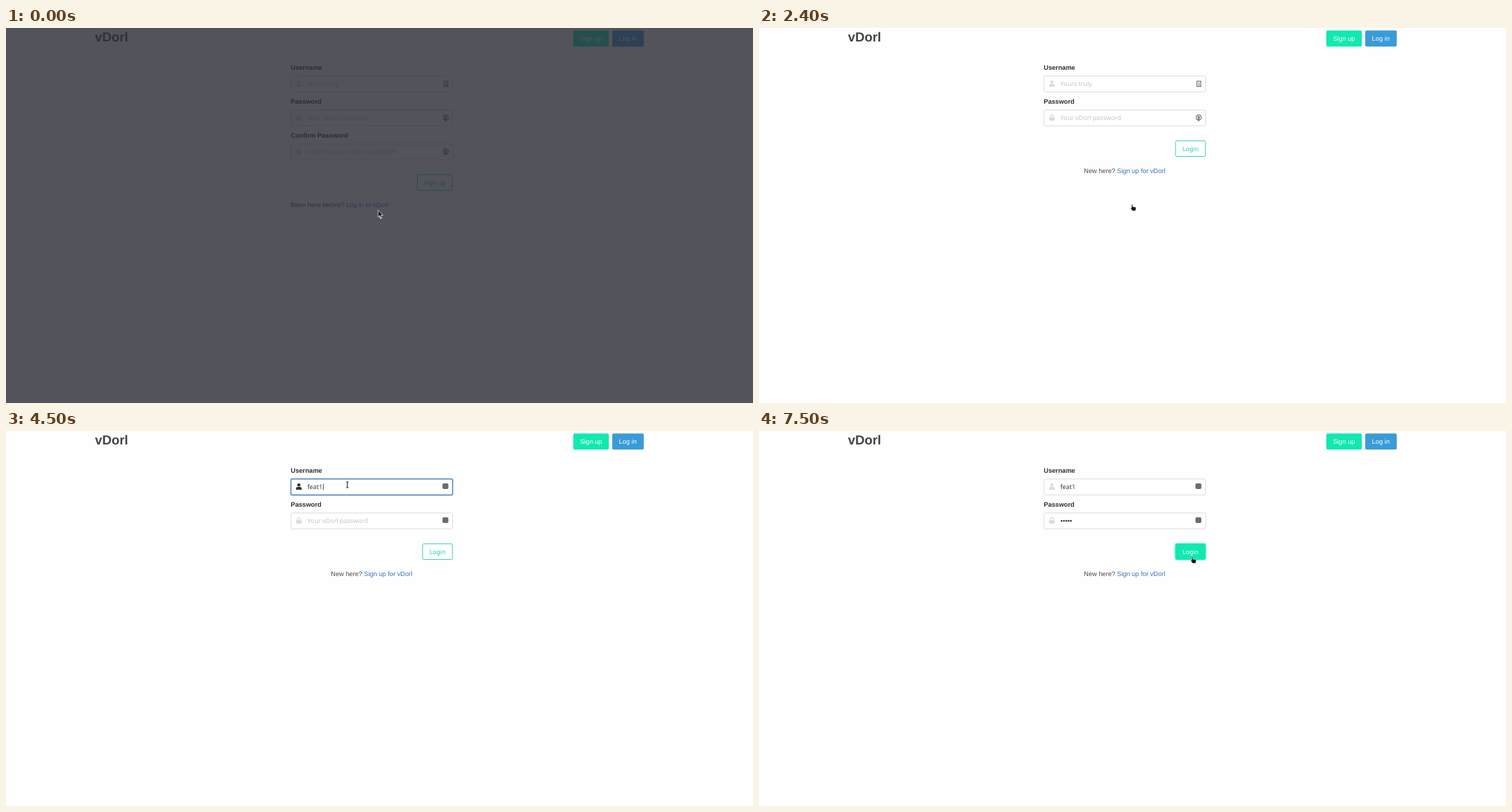
These frames come from a looping animation (1056 px wide and 530 px high, 8 s). An HTML page:

```html
<!DOCTYPE html>
<html lang="en">
<head>
<meta charset="utf-8">
<title>vDorl</title>
<style>
  html, body { margin: 0; width: 100%; height: 100%; overflow: hidden; background: #fefefe; }
  svg { display: block; width: 1056px; height: 530px; text-rendering: geometricPrecision; }
  text { font: 9.2px "Liberation Sans", Arial, sans-serif; fill: #4a4a4a; white-space: pre; }
  .brand { font-size: 18.4px; font-weight: 700; fill: #444; }
  .label { font-weight: 700; fill: #303030; }
  .link { fill: #3a72b8; }
  .link.hover { fill: #363636; }
  .value { font: 8.85px "Noto Sans", sans-serif; fill: #363636; }
  .hint { fill: #c4c4c4; }
  .action { font: 8.6px "Noto Sans", sans-serif; }
  .mid { text-anchor: middle; }
  .white { fill: #fff; }
  .teal { fill: #16d3a6; }
  .row { fill: #e6e6e6; }
</style>
</head>
<body>
<svg id="stage" viewBox="0 0 1056 530"></svg>
<script>
const DURATION = 8000;
const GREEN = '#10e9b1';
const BRAND = 'vDorl';
const USERS = ['feat1', 'tree', 'feat3', 'Norvi', 'nev', 'feat2'];
const MATCHES = ['feat1', 'feat3', 'feat2'];

// [time, changes]; every step keeps what earlier steps set
const steps = [
  [0, { page: 'signup', dim: true, cursor: ['arrow', 525.5, 257], user: '', dots: 0, focus: '', hover: '',
        rows: null, popupRows: 0, badge: false, caret: true, linkHover: false, ring: false }],
  [500, { dim: false }],
  [700, { cursor: ['arrow', 525.5, 255] }],
  [900, { cursor: ['hand', 525, 251], linkHover: true }],
  [1000, { cursor: ['hand', 525, 250] }],
  [1100, { cursor: ['hand', 525, 249] }],
  [2400, { page: 'login', linkHover: false }],
  [2500, { cursor: ['arrow', 525.5, 248] }],
  [2800, { cursor: ['beam', 497, 122], hover: 'password' }],
  [2900, { cursor: ['beam', 482.5, 76], hover: 'user' }],
  [3300, { focus: 'user' }],
  [3500, { rows: USERS, popupRows: 6, badge: true }],
  [3700, { user: 'f', rows: MATCHES, popupRows: 5 }],
  [3800, { user: 'fe' }],
  [3900, { user: 'fea' }],
  [4200, { user: 'feat', popupRows: 3 }],
  [4300, { user: 'feat1', rows: ['feat1'], popupRows: 1 }],
  [4400, { rows: null }],
  [4600, { focus: 'password' }],
  [5200, { dots: 1 }],
  [5300, { dots: 2 }],
  [5600, { dots: 4 }],
  [5800, { dots: 5 }],
  [6400, { caret: false }],
  [6500, { cursor: ['beam', 498, 85] }],
  [6600, { cursor: ['arrow', 527, 104], hover: '' }],
  [6700, { cursor: ['beam', 558, 127], hover: 'password' }],
  [6800, { cursor: ['arrow', 588, 150], hover: '' }],
  [6900, { cursor: ['hand', 606, 171], hover: 'login' }],
  [7000, { cursor: ['hand', 610, 177.5] }],
  [7300, { focus: '' }],
  [7500, { ring: true }]
];

const states = [];
for (const [at, change] of steps) states.push({ ...states.at(-1), ...change, at });

const pen = document.createElement('canvas').getContext('2d');
function textWidth(s) {
  pen.font = '8.85px "Noto Sans", sans-serif';
  return pen.measureText(s).width;
}

const text = (x, y, s, cls = '') => `<text x="${x}" y="${y}" class="${cls}">${s}</text>`;
const box = (x, y, w, h, fill, extra = '') =>
  `<rect x="${x}" y="${y}" width="${w}" height="${h}" fill="${fill}" rx="2" ${extra}/>`;
const path = (d, fill, extra = '') => `<path d="${d}" fill="${fill}" ${extra}/>`;
const at = (x, y, content) => `<g transform="translate(${x} ${y})">${content}</g>`;

const icons = {
  user: c => `<circle cx="4" cy="2.3" r="2.3" fill="${c}"/>` +
    path('M0 9V7.6Q0 5.2 2.4 5.2H5.6Q8 5.2 8 7.6V9Z', c),
  lock: c => box(0, 4, 8, 5.2, c) +
    path('M1.8 4.5V3a2.2 2.2 0 0 1 4.4 0v1.5', 'none', `stroke="${c}" stroke-width="1.3"`)
};

const helpers = {
  user: `<rect x="1.8" y="1" width="5.4" height="7.4" fill="none" stroke="#777" stroke-width="1.2"/>` +
    path('M3.7 3.2H4.8V6.5M3.5 6.5H5.8', 'none', 'stroke="#777"'),
  lock: '<circle cx="4.3" cy="4.2" r="3.5" fill="none" stroke="#777" stroke-width="1.2"/>' +
    '<circle cx="4.3" cy="3.9" r="1.5" fill="#666"/>' + path('M3.6 4H5L5.4 9.3H3.2Z', '#666')
};

const cursors = {
  arrow: path('M.5 .5V10.2L2.8 8.1L4.5 11.7L6.2 10.9L4.6 7.5H7.5Z', '#111',
    'stroke="#fff" stroke-width=".7"'),
  beam: path('M-1.8 -4H1.8M0 -4V4M-1.8 4H1.8', 'none', 'stroke="#333" stroke-width="1.1"'),
  hand: path('M1.6 .8Q2.4 0 3.2 .9V3.4L7.3 4.2Q8.2 4.5 8 5.7L7.2 9.5H3L.4 6Q0 4.7 1.7 5.2Z', '#111',
    'stroke="#fff" stroke-width=".5"')
};

function field(s, { id, y, label, hint, icon, value = '', dots = 0 }) {
  const focused = s.focus === id;
  const border = focused ? '#4479b8' : s.hover === id ? '#b5b5b5' : '#dbdbdb';
  let out = text(402.5, y - 8.7, label, 'label');
  if (focused) out += box(402.3, y - .6, 229.4, 23.6, 'none', 'stroke="#3273dc" stroke-opacity=".25" stroke-width="1.8"');
  out += box(402.9, y, 228.4, 22.4, '#fff', `stroke="${border}" stroke-width="${focused ? 1.2 : 1}"`);
  out += at(410, y + 6, icons[icon](focused ? '#333' : '#dbdbdb'));

  if (dots) {
    for (let i = 0; i < dots; i++) out += `<circle cx="${427.9 + 3.25 * i}" cy="${y + 11.2}" r="1.25" fill="#333"/>`;
  } else {
    out += text(426, y + 14.3, value || hint, value ? 'value' : 'value hint');
  }
  if (focused && s.caret) {
    const end = dots ? dots * 3.25 : value ? textWidth(value) + .6 : 0;
    out += box(426.2 + end, y + 6, .8, 10, '#333');
  }

  if (s.badge) {
    const strong = focused && id === 'password';
    out += box(617, y + 6, 8.4, 8, strong ? '#050505' : '#6c6c6c');
  } else {
    out += at(617.3, y + 6.3, helpers[icon]);
  }
  return out;
}

function header() {
  return text(125.7, 19, BRAND, 'brand') +
    box(802, 3.4, 50.2, 22.8, GREEN) + text(827, 17.9, 'Sign up', 'mid white') +
    box(857, 3.4, 44.6, 22.8, '#3a9bd8') + text(879, 17.9, 'Log in', 'mid white');
}

function submit(x, y, w, label, filled, ring) {
  let out = ring ? box(x - 1, y - 1, w + 2, 24.2, 'none', `stroke="${GREEN}" stroke-opacity=".28" stroke-width="1.5"`) : '';
  out += box(x, y, w, 22.2, filled ? GREEN : '#fff', `stroke="${filled ? GREEN : '#3dd0b2'}"`);
  return out + text(x + w / 2, y + 14.4, label, 'action mid ' + (filled ? 'white' : 'teal'));
}

function popup(rows, count) {
  const height = count * 20.6 + 8.9;
  return box(402, 91, 229.5, height, '#403f3d', 'style="filter:drop-shadow(0 .6px .8px #0007)"') +
    rows.map((name, i) => text(409, 109.3 + 20.6 * i, name, 'row')).join('');
}

function draw(s) {
  const signup = s.page === 'signup';
  let out = box(0, 0, 1056, 530, '#fefefe') + header();
  out += field(s, { id: 'user', y: 67.9, label: 'Username', hint: 'Yours truly', icon: 'user', value: s.user });
  out += field(s, { id: 'password', y: 115.9, label: 'Password', hint: `Your ${BRAND} password`, icon: 'lock', dots: s.dots });
  if (signup) {
    out += field(s, { id: 'confirm', y: 163.9, label: 'Confirm Password', hint: `Confirm your ${BRAND} password`, icon: 'lock' });
    out += submit(581.5, 207.4, 49.6, 'Sign up');
    out += text(402.5, 253.3, 'Been here before?');
    out += text(480.8, 253.3, `Log in to ${BRAND}`, s.linkHover ? 'link hover' : 'link');
  } else {
    out += submit(588.9, 159.4, 42.2, 'Login', s.hover === 'login', s.ring);
    out += text(459.3, 205.3, 'New here?') + text(506, 205.3, `Sign up for ${BRAND}`, 'link');
  }
  if (s.rows) out += popup(s.rows, s.popupRows);
  if (s.dim) {
    out += '<rect width="1056" height="530" fill="#2a2c36" fill-opacity=".81"/>';
    out += path('M528.5 264L530 269.5', 'none', 'stroke="#fff" stroke-width="2"');
  }
  const [shape, x, y] = s.cursor;
  return out + at(x, y, cursors[shape]);
}

const stage = document.getElementById('stage');
let shown = null;
function tick() {
  const time = performance.now() % DURATION;
  const state = states.findLast(s => s.at <= time);
  if (state !== shown) {
    shown = state;
    stage.innerHTML = draw(state);
  }
  requestAnimationFrame(tick);
}
tick();
</script>
</body>
</html>
```
